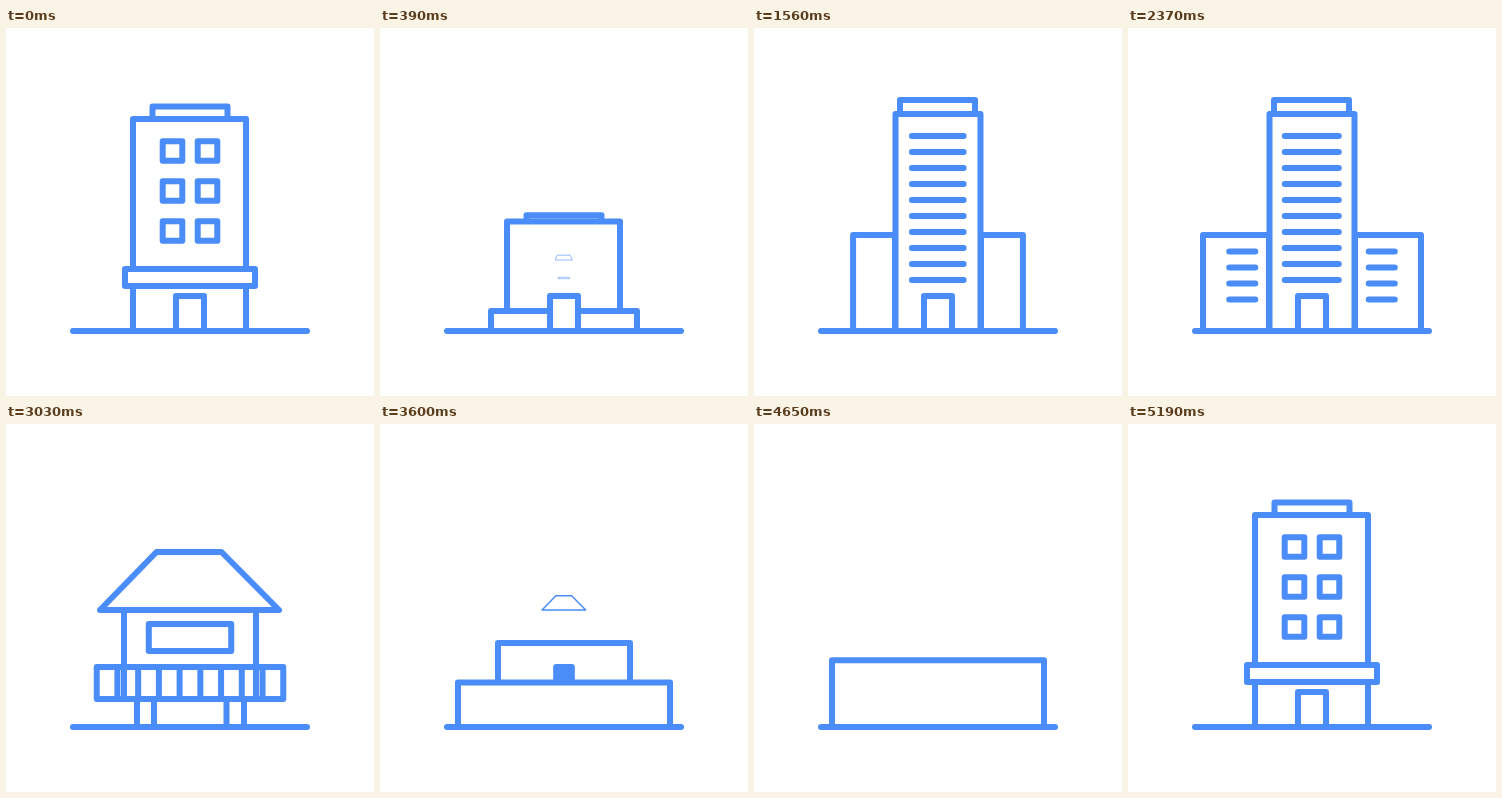
Animation of 368 by 368 pixels, one loop 5.49 s. Source, as an HTML page with a canvas:

```html
<!DOCTYPE html>
<html lang="en">
<head>
<meta charset="utf-8">
<title>Buildings</title>
<style>
  html, body { margin: 0; width: 100%; height: 100%; overflow: hidden; background: #fff; }
  canvas { display: block; width: 100vw; height: 100vh; }
</style>
</head>
<body>
<canvas role="img" aria-label="Line drawings of buildings; one has a sign reading 24 HRS"></canvas>
<script>
const SIZE = 368, LOOP = 5490, STEP = 30, GROUND = 303, MID = 184;
const BLUE = '#4a8cf8', WHITE = '#fff';
const canvas = document.querySelector('canvas');
const ctx = canvas.getContext('2d');
const ratio = Math.max(1, window.devicePixelRatio || 1);
canvas.width = canvas.height = SIZE * ratio;

const rect = (x1, y1, x2, y2) => `M${x1} ${y1}H${x2}V${y2}H${x1}Z`;
const line = (x1, y1, x2, y2) => `M${x1} ${y1}L${x2} ${y2}`;
const repeat = (n, make) => Array.from({ length: n }, (_, i) => make(i)).join('');

const parts = [];
// Axis "x" or "y" stretches the outline; "xy" scales the line weight too.
function part(d, start, end, axis, ox, oy, options = {}) {
  parts.push({
    path: new Path2D(d), start, end: end < start ? end + LOOP : end, axis, ox, oy,
    grow: 400, shrink: 230, fill: WHITE, stroke: BLUE, width: 6, ...options
  });
}

// Hotel
part(rect(127, 91, 240, GROUND) + rect(146.5, 78.5, 221.5, 91), 4710, 230, 'y', MID, GROUND);
part(rect(119, 241, 249, 258), 4780, 170, 'xy', MID, 250);
for (let row = 0; row < 3; row++) {
  for (const x of [166.5, 201.5]) {
    const y = 123 + row * 40;
    part(rect(x - 9.8, y - 9.8, x + 9.8, y + 9.8), 4850 - row * 30, 60 + row * 30, 'xy', x, y,
      { grow: 340 + row * 30 });
  }
}

// Cottage
const dormer = x => `M${x - 13} 255V227L${x} 217L${x + 13} 227V255Z`;
const fence = x => rect(x, 278, x + 60.5, GROUND) +
  repeat(4, i => line(x + 12.1 * (i + 1), 278, x + 12.1 * (i + 1), GROUND));
part(rect(111, 232, 257, GROUND), 360, 960, 'y', MID, GROUND);
part(rect(132, 170, 154, 184), 440, 860, 'y', 143, 184, { grow: 370 });
part('M121 184H246L266.5 232H101Z', 380, 920, 'xy', MID, 232);
for (const x of [143, 224.5]) part(dormer(x), 440, 850, 'xy', x, 236, { grow: 370 });
part(fence(87) + fence(220.5), 460, 900, 'x', MID, GROUND, { grow: 350 });

// Tower
for (const [inner, outer, from, to] of [[141, 75, 101, 127.5], [227, 293, 240.5, 267]]) {
  part(rect(outer, 207, inner, GROUND), 1470, 2400, 'x', inner, GROUND, { grow: 450 });
  part(repeat(4, i => line(from, 223.5 + 16 * i, to, 223.5 + 16 * i)),
    1740, 2340, 'x', (from + to) / 2, 247);
}
part(rect(141.5, 86, 226.5, GROUND) + rect(146, 72, 221, 86), 1040, 2470, 'y', MID, GROUND);
part(repeat(10, i => line(156.5, 108 + 16 * i, 211, 108 + 16 * i)), 1400, 2350, 'x', MID, 180);

// Entrance shared by hotel, cottage and tower
part(rect(170, 268, 198, GROUND), 4790, 2420, 'y', MID, GROUND);

// Stilt hut
part(repeat(4, i => line([131, 148, 220.5, 238][i], 275, [131, 148, 220.5, 238][i], GROUND)),
  2500, 3480, 'y', MID, GROUND, { grow: 380 });
part(rect(118, 186, 250, 275), 2560, 3460, 'y', MID, 275, { grow: 360 });
part('M150.5 128H215.5L273 186H94Z', 2560, 3400, 'xy', MID, 186);
part(rect(143, 200, 225, 227), 2660, 3350, 'xy', MID, 213);
part(rect(92, 243, 276, 275) +
  repeat(8, i => line(112.4 + 20.45 * i, 243, 112.4 + 20.45 * i, 275)),
  2680, 3380, 'x', MID, 259, { fill: null });

// Motel
const rooms = base => repeat(3, i => {
  const x = MID + 70.5 * i;
  return rect(x - 96, base - 44, x - 79, base - 26) + rect(x - 69.5, base - 44, x - 46.5, base);
});
const lettering =
  'M82 126H89.5V132.5H82V139.5H89.5' +
  'M94 126V133H102.5M102.5 126V139.5' +
  'M112.5 126V139.5M120.5 126V139.5M112.5 132.5H120.5' +
  'M125 139.5V126H132.5V132.5H125M128 132.5L133 139.5' +
  'M145.5 126H138V132.5H145.5V139.5H138';
part(rect(78, 233, 290, GROUND), 3520, 4600, 'y', MID, GROUND);
part(line(95, 148, 95, 166) + line(131.5, 148, 131.5, 166), 3600, 4420, 'y', 113, 168);
part(rect(77, 121, 150, 145), 3600, 4420, 'xy', 113, 168, { fill: BLUE });
part(lettering, 3600, 4420, 'xy', 113, 168, { fill: null, stroke: WHITE, width: 1.9 });
part('M74.5 168H293.5L295 233H73Z', 3600, 4400, 'xy', MID, 233);
part(rooms(GROUND), 3700, 4400, 'xy', MID, GROUND);
part(rooms(233), 3920, 4350, 'xy', MID, 233);

const ground = new Path2D(line(67, GROUND, 301, GROUND));

const backOut = u => {
  const bend = 1.15, v = u - 1;
  return 1 + (bend + 1) * v ** 3 + bend * v * v;
};
const clamp = u => Math.min(1, Math.max(0, u));

function drawPart(p, time) {
  const t = time < p.start ? time + LOOP : time;
  const k = backOut(clamp((t - p.start) / p.grow)) * (1 - clamp((t - p.end) / p.shrink) ** 2);
  if (k < 0.005) return;
  const sx = p.axis === 'y' ? 1 : k;
  const sy = p.axis === 'x' ? 1 : k;
  const shape = new Path2D();
  shape.addPath(p.path, new DOMMatrix([sx, 0, 0, sy, p.ox * (1 - sx), p.oy * (1 - sy)]));
  if (p.fill) {
    ctx.fillStyle = p.fill;
    ctx.fill(shape);
  }
  ctx.strokeStyle = p.stroke;
  ctx.lineWidth = p.axis === 'xy' ? p.width * k : p.width;
  ctx.stroke(shape);
}

function render(now) {
  const time = Math.floor((now % LOOP) / STEP) * STEP;
  ctx.setTransform(ratio, 0, 0, ratio, 0, 0);
  ctx.fillStyle = WHITE;
  ctx.fillRect(0, 0, SIZE, SIZE);
  ctx.lineCap = ctx.lineJoin = 'round';
  for (const p of parts) drawPart(p, time);
  ctx.strokeStyle = BLUE;
  ctx.lineWidth = 6;
  ctx.stroke(ground);
}

const begin = performance.now();
function tick() {
  render(performance.now() - begin);
  requestAnimationFrame(tick);
}
tick();
</script>
</body>
</html>
```
